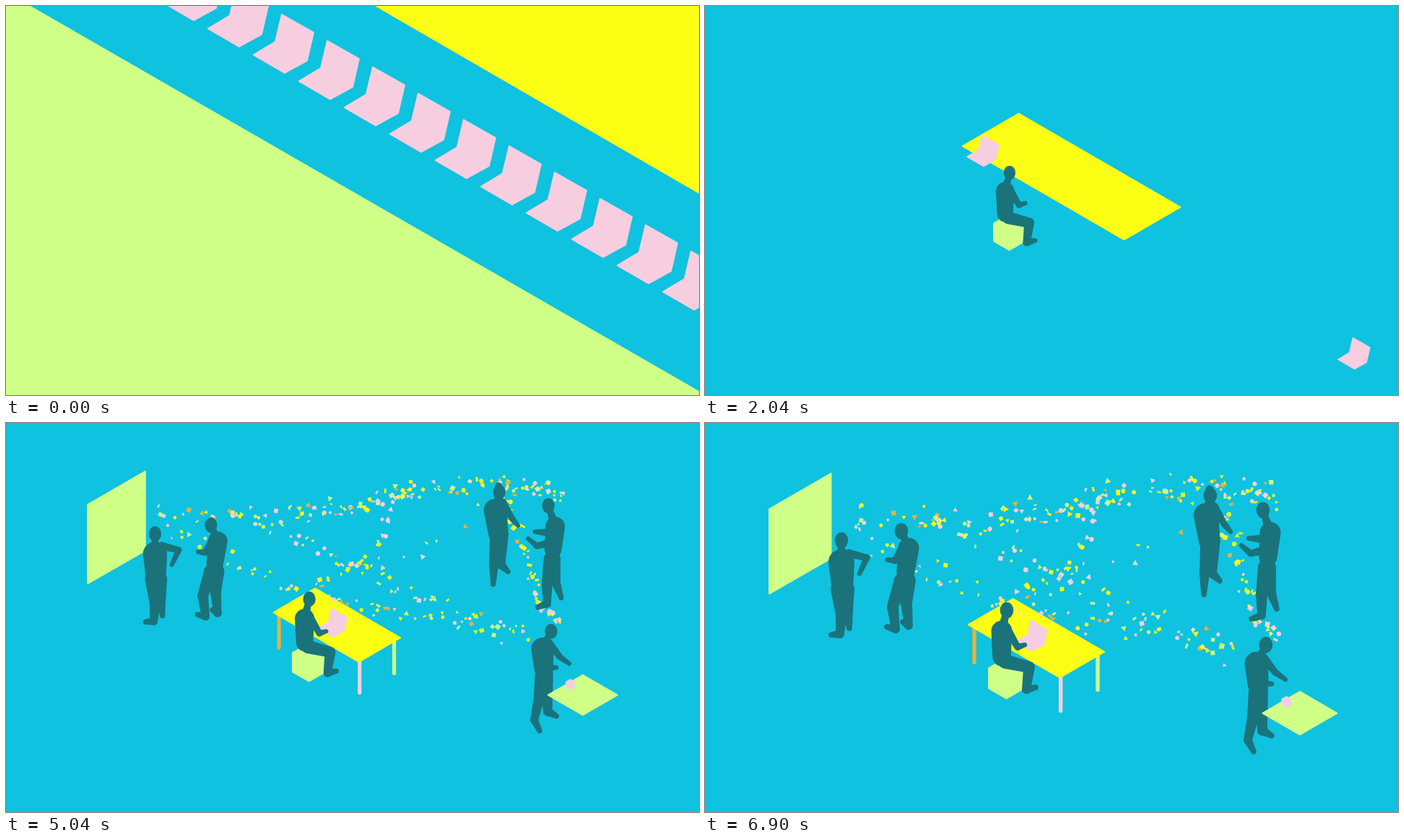
Write an HTML page with a canvas that moves like this. It is 960 px wide and 540 px high and loops after 6.93 s.

```html
<!DOCTYPE html>
<html>
<head>
<meta charset="utf-8">
<style>
html, body { margin: 0; height: 100%; overflow: hidden; background: #0fc2df; }
canvas { display: block; }
</style>
</head>
<body>
<canvas id="stage" width="960" height="540"></canvas>
<script>
const LOOP = 6930, BASE = 0.878, ISO = 0.58;
const BLUE = '#0fc2df', LIME = '#d0ff87', YELLOW = '#fcff13', PINK = '#f7cedf', ORANGE = '#e2b33f', DARK = '#1a737b';
const g = document.getElementById('stage').getContext('2d');
g.lineJoin = g.lineCap = 'round';

const clamp = x => Math.max(0, Math.min(1, x));
const lerp = (a, b, p) => a + (b - a) * p;
const phase = (t, from, to) => clamp((t - from) / (to - from));
const inOut = p => p < 0.5 ? 4 * p ** 3 : 1 - 4 * (1 - p) ** 3;
const backOut = p => 1 + 2.2 * (p - 1) ** 3 + 1.2 * (p - 1) ** 2;

function poly(points, color, line = 2) {
  const path = new Path2D('M' + points.flat().join(' ') + 'Z');
  g.fillStyle = g.strokeStyle = color;
  g.lineWidth = line;
  g.fill(path);
  g.stroke(path);
}

// Hexagon with vertical sides; squash narrows it
const hexagon = (x, y, r, squash = 1) => [0, 1, 2, 3, 4, 5].map(i =>
  [x + r * squash * Math.sin(i * Math.PI / 3), y - r * Math.cos(i * Math.PI / 3)]);

// Rectangle lying on the floor, by its limits along the two floor axes
function floorRect(a0, a1, b0, b1) {
  const at = (a, b) => [a - b, (a + b) * ISO];
  return [at(a0, b0), at(a1, b0), at(a1, b1), at(a0, b1)];
}

function zoom(s, x = 450, y = 27) {
  g.translate(x, y);
  g.scale(s, s);
  g.translate(-x, -y);
}

// People: joints joined by tapering limbs
function taper(x1, y1, r1, x2, y2, r2) {
  const side = Math.atan2(y2 - y1, x2 - x1) + Math.PI / 2;
  g.beginPath();
  g.arc(x1, y1, r1, side, side + Math.PI);
  g.arc(x2, y2, r2, side + Math.PI, side + 2 * Math.PI);
  g.fill();
}

function limb(joints, r0, r1) {
  const n = joints.length - 1;
  for (let i = 0; i < n; i++)
    taper(...joints[i], lerp(r0, r1, i / n), ...joints[i + 1], lerp(r0, r1, (i + 1) / n));
}

function person({ head, chest, hip, build, arms, legs, bun }) {
  const [x, y] = head;
  g.fillStyle = DARK;
  g.beginPath();
  g.ellipse(x, y, 9.3, 11.3, 0, 0, 7);
  g.fill();
  if (bun) taper(x - 1, y - 9, 5.5, x, y, 6);
  limb([head, chest], 4, 7);
  limb([chest, hip], build, build * 0.87);
  for (const arm of arms) limb(arm, 6, 3.2);
  for (const leg of legs) limb(leg, 10, 3.8);
}

const walker = {
  head: [458, 196], chest: [452, 218], hip: [451, 250], build: 15,
  arms: [[[463, 216], [473, 240], [475, 262]]],
  legs: [[[446, 256], [437, 282], [427, 300]], [[459, 258], [459, 290], [457, 319], [466, 314]]]
};
const sitter = {
  head: [418, 260], chest: [411, 289], hip: [411, 325], build: 14.5,
  arms: [[[416, 282], [433, 311], [443, 308]]],
  legs: [[[416, 331], [449, 339], [445, 370], [458, 367]]]
};
const team = [
  { start: 2600, head: [189, 163], chest: [189, 193], hip: [190, 220], build: 18,
    arms: [[[199, 181], [224, 187], [214, 209]]],
    legs: [[[184, 230], [189, 266], [187, 293], [175, 294]], [[197, 230], [198, 262], [200, 285]]] },
  { start: 2800, head: [272, 150], chest: [282, 174], hip: [278, 206], build: 14.5,
    arms: [[[275, 172], [263, 191], [253, 190]]],
    legs: [[[272, 218], [260, 255], [264, 286], [252, 283]], [[282, 218], [279, 250], [282, 281], [274, 276]]] },
  { start: 3150, head: [700, 101], chest: [694, 128], hip: [699, 164], build: 17, bun: true,
    arms: [[[705, 116], [719, 140], [728, 151]]],
    legs: [[[696, 172], [692, 210], [691, 238]], [[703, 172], [702, 208], [713, 219]]] },
  { start: 3300, head: [773, 121], chest: [783, 152], hip: [780, 186], build: 14.5,
    arms: [[[773, 177], [756, 181], [743, 170]], [[772, 161], [753, 160]]],
    legs: [[[776, 200], [771, 238], [771, 267], [757, 272]], [[781, 200], [784, 235], [792, 258]]] },
  { start: 3200, head: [777, 308], chest: [764, 334], hip: [766, 362], build: 16.5,
    arms: [[[774, 326], [790, 346], [804, 356]], [[770, 362], [785, 362]]],
    legs: [[[763, 372], [759, 408], [752, 440], [760, 456]], [[770, 370], [772, 427], [785, 434]]] }
];

// Confetti: routes between the groups; gap is the mean distance between pieces
const routes = [
  { gap: 5.5, way: [[195, 132], [400, 132], [490, 122], [570, 96]] },
  { gap: 3.8, way: [[540, 102], [700, 88], [797, 103]] },
  { gap: 8, way: [[290, 130], [380, 158], [500, 215], [620, 270], [740, 315]] },
  { gap: 9, way: [[200, 150], [380, 241], [540, 280], [740, 315]] },
  { gap: 7, way: [[425, 235], [520, 190], [545, 105]] },
  { gap: 22, way: [[470, 235], [570, 195], [690, 115]] },
  { gap: 5, way: [[700, 95], [740, 190], [755, 265], [792, 300]] }
];
let seed = 11;
const rnd = () => (seed = seed * 16807 % 2147483647) / 2147483647;
const hues = [YELLOW, YELLOW, YELLOW, YELLOW, PINK, PINK, PINK, LIME, LIME, ORANGE];
const bits = routes.flatMap(({ gap, way }) => {
  const [first, last] = [way[0], way[way.length - 1]];
  const count = Math.round(Math.hypot(last[0] - first[0], last[1] - first[1]) / gap);
  return Array.from({ length: count }, (_, i) => ({
    way, u: (i + rnd()) / count, speed: 0.01 + rnd() * 0.02,
    dx: (rnd() + rnd() - 1) * 14, dy: (rnd() + rnd() - 1) * 22,
    size: 1.8 + rnd() * 1.6, kind: Math.floor(rnd() * 4), color: hues[Math.floor(rnd() * 10)], spin: rnd() * 6
  }));
});

function along(way, u) {
  const n = way.length - 1, i = Math.min(n - 1, Math.floor(u * n)), p = u * n - i;
  return [0, 1].map(k => lerp(way[i][k], way[i + 1][k], p));
}

function confetti(t) {
  const age = (t - 3870) / 1000, spread = 0.5 + age * 0.2;
  for (const b of bits) {
    if (age < b.u * 0.9) continue;
    const [x, y] = along(b.way, (b.u + age * b.speed) % 1), s = b.size;
    g.save();
    g.translate(x + b.dx * spread, y + b.dy * spread);
    g.rotate(b.spin + age * 1.5);
    g.fillStyle = b.color;
    g.beginPath();
    if (b.kind == 0) g.arc(0, 0, s, 0, 7);
    else if (b.kind == 1) g.rect(-s, -s, 2 * s, 2 * s);
    else if (b.kind == 2) { g.moveTo(-s * 1.2, s); g.lineTo(s * 1.2, s); g.lineTo(0, -s * 1.2); }
    else g.rect(-s, -s * 0.5, 2 * s, s);
    g.fill();
    g.restore();
  }
}

function pop(t, start, x, y, points, color) {
  if (t <= start) return;
  g.save();
  zoom(Math.max(0.01, backOut(phase(t, start, start + 350))), x, y);
  poly(points, color);
  g.restore();
}

// The lime ground is a huge hexagon: it folds to a sliver, then opens as the stool
function lime(t) {
  const fold = inOut(phase(t, 780, 1270)), open = inOut(phase(t, 1400, 1950));
  const mix = (ground, sliver, stool) => lerp(lerp(ground, sliver, fold), stool, open);
  poly(hexagon(mix(-100, 424, 421.5), mix(1223, 312, 314.3), mix(1300, 14, 25.2), mix(1, 0.05, 1)), LIME, 1);
}

function tableTop(e) {
  const mid = 458, half = lerp(480, 55.5, e);
  poly(floorRect(mid - half, mid + half, lerp(-490, -27, e), lerp(-255.5, 27, e)), YELLOW, lerp(0.1, 2, e));
}

const laptop = [[0, 1], [44, 26], [35, 65], [4, 82], [-39, 57], [-9, 39]];
function laptops(t, e) {
  const size = lerp(1, 0.47, e);
  for (let j = -1; j < 20; j++) {
    const x0 = 382 + 63 * (j - 8) + t / 30;
    const x = lerp(x0, 451 + 583 * j, e), y = lerp(48 + (x0 - 446) * ISO, 243 + 319 * j, e);
    g.save();
    g.translate(x, y);
    g.scale(size, size);
    poly(laptop, PINK);
    g.restore();
  }
}

function tableLegs(t) {
  const p = inOut(phase(t, 2340, 2750));
  if (!p) return;
  g.lineWidth = 5.5;
  for (const [x, y, color] of [[373, 286, ORANGE], [492.7, 353, PINK], [544, 324, LIME]]) {
    g.strokeStyle = color;
    g.beginPath();
    g.moveTo(x, y);
    g.lineTo(x, y + 46.5 * p);
    g.stroke();
  }
}

const board = [[89, 119.5], [174.5, 70], [174.5, 188], [89, 237]];
const desk = floorRect(733.5, 785, -90.5, -39);
const lump = hexagon(805.5, 387, 7);

function draw(t) {
  const scale = Math.max(BASE, 1 - 3.6e-5 * (6900 - t)), e = inOut(phase(t, 1400, 2345));
  const scaled = (s, paint) => { g.save(); zoom(s); paint(); g.restore(); };
  const wide = paint => scaled(scale / BASE, paint), close = paint => scaled(scale, paint);
  g.fillStyle = BLUE;
  g.fillRect(0, 0, 960, 540);
  wide(() => lime(t));
  close(() => tableLegs(t));
  wide(() => { tableTop(e); laptops(t, e); });
  close(() => {
    pop(t, 2480, 132, 154, board, LIME);
    confetti(t);
    if (t >= 1650) person(sitter);
    for (const one of team) if (t >= one.start) person(one);
    pop(t, 3080, 824, 403, desk, LIME);
    pop(t, 3400, 806, 387, lump, PINK);
  });
  if (t >= 1150 && t < 1650) wide(() => person(walker));
  // the sliver stands in front of the walker's foot
  if (t >= 1270 && t < 1650) wide(() => lime(t));
}

const begin = performance.now();
function tick() {
  draw((performance.now() - begin) % LOOP);
  requestAnimationFrame(tick);
}
tick();
</script>
</body>
</html>
```
